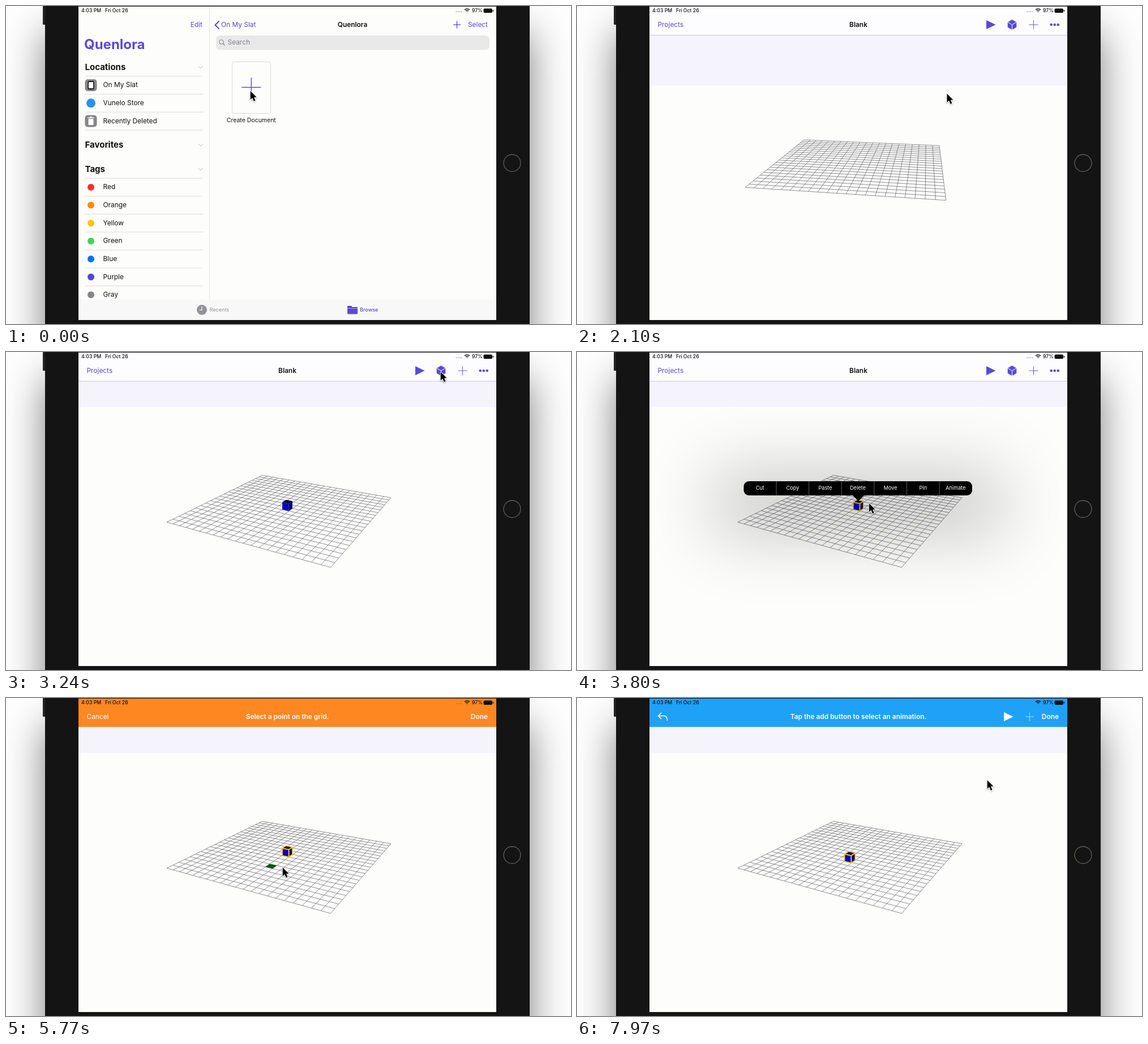
Write an HTML page with a canvas that moves like this. It is 998x561 px and loops after 8000 ms.

```html
<!DOCTYPE html>
<html lang="en">
<head>
<meta charset="utf-8">
<title>Tablet scene editor</title>
<style>
  html, body { margin: 0; width: 100%; height: 100%; overflow: hidden; background: #fefefe; }
  canvas { display: block; }
</style>
</head>
<body>
<canvas id="stage" width="998" height="561"></canvas>
<script>
const ctx = document.getElementById('stage').getContext('2d');
const LOOP = 8000, PURPLE = '#5b49d6', INK = '#111', PAPER = '#fdfdfc', RULE = '#dcdce2';
const SCREEN = { x: 128, y: 1, w: 738, h: 553 };
const MID = 497, BAR_Y = 33, ROW = 31.65, BODY = 11.9;
const CELLS = 21;

// Event times in ms
const OPEN = [270, 800], DRAG = [1607, 2740], CUBE = 3020, SELECT = 3600, MENU = [3640, 4080];
const POPOVER = [4360, 5060], POINT = [5060, 6320], MARK = 5480, PLAY = [7430, 8430];

// Pointer stops: arrival time, x, y and optional travel time
const STOPS = [
  [0, 432, 150],
  [1640, 730, 134],
  [2740, 516, 192, 1070],
  [3020, 768, 35],
  [3560, 498, 270],
  [4040, 668, 242],
  [4330, 799, 36],
  [4500, 642, 69, 120],
  [5440, 468, 297],
  [5750, 489, 299, 150],
  [6220, 836, 35],
  [6850, 762, 35],
  [7800, 725, 145]
];

const clamp = (v, lo = 0, hi = 1) => Math.max(lo, Math.min(hi, v));
const mix = (a, b, p) => a + (b - a) * p;
const progress = (t, [from, to]) => clamp((t - from) / (to - from));
const smooth = p => p * p * (3 - 2 * p);
const within = (t, [from, to]) => t >= from && t < to;

function pointer(t) {
  let [, x, y] = STOPS[0];
  for (const [arrive, nx, ny, travel = 300] of STOPS.slice(1)) {
    const p = smooth(progress(t, [arrive - travel, arrive]));
    x = mix(x, nx, p);
    y = mix(y, ny, p);
  }
  return [x, y];
}

function text(s, x, y, { size = BODY, color = INK, weight = 400, align = 'left' } = {}) {
  ctx.font = `${weight} ${size}px Inter, sans-serif`;
  ctx.textAlign = align;
  ctx.textBaseline = 'middle';
  ctx.fillStyle = color;
  ctx.fillText(s, x, y);
}
function box(x, y, w, h, color, radius = 0) {
  ctx.fillStyle = color;
  ctx.beginPath();
  ctx.roundRect(x, y, w, h, radius);
  ctx.fill();
}
function dot(x, y, r, color) {
  ctx.fillStyle = color;
  ctx.beginPath();
  ctx.arc(x, y, r, 0, 7);
  ctx.fill();
}
function ring(x, y, r, color, width, from = 0, to = Math.PI * 2) {
  ctx.strokeStyle = color;
  ctx.lineWidth = width;
  ctx.beginPath();
  ctx.arc(x, y, r, from, to);
  ctx.stroke();
}
function path(points) {
  ctx.beginPath();
  points.forEach(([x, y]) => ctx.lineTo(x, y));
}
function shape(points, color) {
  path(points);
  ctx.fillStyle = color;
  ctx.fill();
}
function line(points, color, width = 1) {
  path(points);
  ctx.strokeStyle = color;
  ctx.lineWidth = width;
  ctx.stroke();
}
function plus(x, y, r, color, width) {
  line([[x - r, y], [x + r, y]], color, width);
  line([[x, y - r], [x, y + r]], color, width);
}
// An open "v" of half width r; dx or dy picks its direction
function chevron(x, y, r, dx, dy, color, width) {
  line([[x - r * (dx + dy), y + r * (dx - dy)], [x, y], [x - r * (dx - dy), y - r * (dx + dy)]], color, width);
}
// Shadow alone: its box is drawn off stage
function shadow(x, y, w, h, blur, alpha) {
  ctx.save();
  ctx.shadowColor = `rgba(0,0,0,${alpha})`;
  ctx.shadowBlur = blur;
  ctx.shadowOffsetX = 3000;
  box(x - 3000, y, w, h, '#000', 10);
  ctx.restore();
}
function faded(alpha, draw) {
  if (alpha <= 0) return;
  ctx.save();
  ctx.globalAlpha *= alpha;
  draw();
  ctx.restore();
}
function bar(color) {
  box(SCREEN.x, 0, SCREEN.w, 51, color);
}
function title(s, color = INK, x = MID) {
  text(s, x, BAR_Y + 0.5, { color, weight: 600, align: 'center' });
}
function done() {
  text('Done', 851, BAR_Y + 0.5, { color: '#fff', weight: 600, align: 'right' });
}
const playIcon = (x, color) => shape([[x, BAR_Y - 8], [x + 16.5, BAR_Y], [x, BAR_Y + 8]], color);

function drawTablet() {
  box(0, 0, 998, 561, '#fefefe');
  shadow(71, 48, 852, 700, 72, 0.54);
  box(65, 0, 6, 33, '#222', 1);
  box(69, 0, 856, 561, '#141414');
  ring(894, 277, 15, '#625f59', 1.3);
}

function drawStatus() {
  const small = { size: 8.7, weight: 500 };
  text('4:03 PM', 133, 8, small);
  text('Fri Oct 26', 175, 8, small);
  for (let i = 0; i < 4; i++) dot(795.5 + i * 3, 10, 0.8, '#777');
  for (let i = 0; i < 3; i++) ring(814.5, 11, 1 + i * 2.6, INK, 1.3, -Math.PI * 0.76, -Math.PI * 0.24);
  text('97%', 823, 8, small);
  box(843.5, 4.5, 15.5, 7.5, INK, 2);
  box(859.8, 6.8, 1.4, 3, INK);
}

function drawSidebar() {
  const edge = 139.5, icon = 150, label = 171.5;
  text('Edit', 347, BAR_Y, { color: PURPLE, align: 'right' });
  text('Quenlora', 138, 69, { size: 24, color: PURPLE, weight: 700 });
  const heading = (s, y) => {
    text(s, edge, y, { size: 15, weight: 700 });
    chevron(343.5, y + 2, 4, 0, 1, '#b9b9be', 1);
  };
  const rows = (names, y, drawIcon) => names.forEach((name, i) => {
    const rowY = y + i * ROW;
    line([[edge, rowY - ROW / 2], [348, rowY - ROW / 2]], RULE);
    drawIcon(i, rowY);
    text(name, label, rowY);
  });
  const drawPlaceIcon = (i, y) => {
    if (i === 1) return dot(icon, y, 8, '#2393f0');
    box(icon - 10.5, y - 10.5, 21, 21, '#85858a', 5);
    if (i === 0) {
      box(icon - 5.5, y - 7.5, 11, 15, INK, 2);
      box(icon - 4, y - 5.5, 8, 11, '#fff');
    } else {
      box(icon - 4.5, y - 4, 9, 11, '#fff', 1);
      box(icon - 6, y - 6.5, 12, 1.4, '#fff');
      box(icon - 2, y - 8, 4, 1.5, '#fff');
    }
  };
  heading('Locations', 108);
  rows(['On My Slat', 'Vunelo Store', 'Recently Deleted'], 139.7, drawPlaceIcon);
  line([[edge, 219], [348, 219]], RULE);
  heading('Favorites', 245);
  heading('Tags', 288);
  const tags = { Red: '#f4312d', Orange: '#fb8b0c', Yellow: '#fcc50b', Green: '#43d158',
    Blue: '#0a70f5', Purple: '#5149c9', Gray: '#858589' };
  rows(Object.keys(tags), 319.7, (i, y) => dot(icon, y, 6, Object.values(tags)[i]));
}

function drawBrowser() {
  box(SCREEN.x, 0, SCREEN.w, 554, PAPER);
  line([[359.5, 0], [359.5, 518]], '#e4e4e4');
  drawSidebar();

  chevron(369.5, BAR_Y + 0.5, 7, -1, 0, PURPLE, 2);
  text('On My Slat', 380, BAR_Y + 0.5, { color: PURPLE });
  title('Quenlora', INK, 612);
  plus(796.5, BAR_Y, 6.5, PURPLE, 1.3);
  text('Select', 851, BAR_Y + 0.5, { color: PURPLE, align: 'right' });
  box(371, 52, 483, 25.5, '#e9e9ea', 7);
  ring(380.5, 63.5, 3.7, '#808086', 1.1);
  line([[383.2, 66.2], [386.5, 69.5]], '#808086', 1.2);
  text('Search', 391.5, 64.5, { color: '#808086' });

  ctx.strokeStyle = '#dadad6';
  ctx.lineWidth = 1;
  ctx.beginPath();
  ctx.roundRect(399.5, 98.5, 68, 91, 3);
  ctx.stroke();
  plus(433.3, 143.5, 17, PURPLE, 1.4);
  text('Create Document', 433.3, 202, { size: 10.5, align: 'center' });

  box(SCREEN.x, 518, SCREEN.w, 36, '#f8f8f8');
  dot(346, 536, 9, '#929296');
  line([[346, 530], [346, 536.5], [341.5, 536.5]], '#fff', 1.2);
  text('Recents', 359.5, 536.5, { size: 9.1, color: '#929296' });
  box(603, 529, 8, 4, PURPLE, 1);
  box(603, 531, 18, 12.5, PURPLE, 1);
  line([[603, 533.5], [621, 533.5]], '#b7aef0', 0.8);
  text('Browse', 625, 536.5, { size: 9.1, color: PURPLE, weight: 500 });
  drawStatus();
}

// Orbit camera steered by the drag; the floor spans -1 to 1 both ways
function orbit(t) {
  const [x, y] = pointer(clamp(t, ...DRAG));
  const yaw = (720 - x) * 0.145, pitch = 14.7 + (y - 134) * 0.14;
  const rad = Math.PI / 180, focal = 680, distance = 4.7;
  const cosY = Math.cos(yaw * rad), sinY = Math.sin(yaw * rad);
  const cosP = Math.cos(pitch * rad), sinP = Math.sin(pitch * rad);
  const project = (px, pz) => {
    const side = px * cosY - pz * sinY, near = px * sinY + pz * cosY;
    const scale = focal / (distance - near * cosP);
    return [MID + side * scale, 277 + near * sinP * scale];
  };
  return { project, skyline: 166 - (pitch - 14.7) * 8.8 };
}
// Corners of the cell that lies the given number of rows in front of the middle
function tile(project, row, size = 1) {
  const r = size / CELLS, z = row * 2 / CELLS;
  return [[-r, z - r], [r, z - r], [r, z + r], [-r, z + r]].map(p => project(...p));
}

function drawCube(project, row, selected) {
  const base = tile(project, row, 0.95), top = base.map(([x, y]) => [x, y - 13]);
  const faces = [
    [top, '#00003c'],
    [[top[3], top[2], base[2], base[3]], '#0505c4'],
    [[top[2], top[1], base[1], base[2]], '#000070']
  ];
  ctx.lineJoin = 'round';
  for (const [points, color] of faces) shape(points, color);
  if (selected) for (const [points] of faces) line([...points, points[0]], '#efc62c', 1.6);
}

function drawScene(t) {
  const { project, skyline } = orbit(t);
  box(SCREEN.x, 0, SCREEN.w, 554, PAPER);
  box(SCREEN.x, 51, SCREEN.w, skyline - 51, '#f5f4fd');
  for (let i = 0; i <= CELLS; i++) {
    const at = i / CELLS * 2 - 1;
    line([project(at, -1), project(at, 1)], '#69696e', 0.75);
    line([project(-1, at), project(1, at)], '#69696e', 0.75);
  }
  if (within(t, [MARK, POINT[1]])) shape(tile(project, 4), '#05590f');
  if (t >= CUBE) drawCube(project, 4 * progress(t, PLAY), t >= SELECT);
}

function drawEditorBar() {
  bar('#fdfcfe');
  line([[SCREEN.x, 51.5], [866, 51.5]], '#c9c4ec');
  text('Projects', 142.5, BAR_Y + 0.5, { color: PURPLE });
  title('Blank');
  playIcon(723, PURPLE);
  const hexagon = Array.from({ length: 6 }, (_, i) =>
    [768.5 + 9 * Math.sin(i * Math.PI / 3), BAR_Y - 9 * Math.cos(i * Math.PI / 3)]);
  shape(hexagon, PURPLE);
  for (const i of [1, 3, 5]) line([[768.5, BAR_Y], hexagon[i]], '#fff');
  plus(806.5, BAR_Y, 8, PURPLE, 0.9);
  for (let i = -1; i <= 1; i++) dot(843.7 + i * 6, BAR_Y, 2.3, PURPLE);
}

function drawAnimationBar(dimmed) {
  bar('#1fa1f8');
  chevron(143.5, 31.5, 5.5, -1, 0, '#fff', 1.5);
  ctx.beginPath();
  ctx.moveTo(144, 31.5);
  ctx.lineTo(153, 31.5);
  ctx.quadraticCurveTo(159.5, 31.5, 159.5, 40);
  ctx.stroke();
  title('Tap the add button to select an animation.', '#fff');
  playIcon(754, dimmed ? '#dceefb' : '#fff');
  plus(799.5, BAR_Y, 7.5, dimmed ? '#a5d5f6' : '#c5e5fd', 0.9);
  done();
}

function drawPointBar() {
  bar('#fd8721');
  text('Cancel', 142.5, BAR_Y + 0.5, { color: '#fff' });
  title('Select a point on the grid.', '#fff');
  done();
}

function drawMenu() {
  shadow(240, 215, 514, 105, 125, 0.23);
  box(294.5, 228, 403.5, 25, '#000', 9);
  shape([[486, 252], [MID, 263], [508, 252]], '#000');
  ['Cut', 'Copy', 'Paste', 'Delete', 'Move', 'Pin', 'Animate'].forEach((label, i) => {
    const x = 323.3 + i * 57.6;
    if (i) line([[x - 28.8, 228], [x - 28.8, 253]], '#77777a', 0.8);
    text(label, x, 240.7, { size: 9.2, color: '#fff', align: 'center' });
  });
}

function drawPopover() {
  box(628, 51, 230, 251, PAPER, 9);
  shape([[788, 52], [799.5, 40.5], [811, 52]], PAPER);
  text('Edit', 847, 69, { color: PURPLE, align: 'right' });
}

function drawEditor(t) {
  const popover = within(t, POPOVER) ? progress(t, [POPOVER[0], POPOVER[0] + 90]) : 0;
  drawScene(t);
  faded(popover, () => shadow(628, 70, 230, 280, 130, 0.26));
  if (t < MENU[1]) drawEditorBar();
  else if (within(t, POINT)) drawPointBar();
  else drawAnimationBar(popover > 0);
  drawStatus();
  if (within(t, MENU)) faded(progress(t, [MENU[0], MENU[0] + 100]), drawMenu);
  faded(popover, drawPopover);
}

function drawPointer(t) {
  const [x, y] = pointer(t);
  const arrow = [[0, 0], [0, 17], [3.9, 13.4], [6.8, 20], [9.8, 18.7], [7, 12.2], [12, 12], [0, 0]];
  ctx.save();
  ctx.translate(x - 0.3, y);
  ctx.scale(0.9, 0.9);
  ctx.shadowColor = 'rgba(0,0,0,.3)';
  ctx.shadowBlur = 3;
  ctx.shadowOffsetY = 1.5;
  ctx.lineJoin = 'round';
  line(arrow, '#fff', 2);
  ctx.shadowColor = 'transparent';
  shape(arrow, '#000');
  ctx.restore();
}

function draw(now) {
  const t = now % LOOP;
  drawTablet();
  ctx.save();
  ctx.beginPath();
  ctx.rect(SCREEN.x, SCREEN.y, SCREEN.w, SCREEN.h);
  ctx.clip();
  const p = smooth(progress(t, OPEN));
  if (p < 1) drawBrowser();
  if (p > 0) {
    // The new document grows out of its thumbnail
    ctx.translate(mix(399, SCREEN.x, p), mix(98, 0, p));
    ctx.scale(mix(69 / SCREEN.w, 1, p), mix(92 / SCREEN.h, 1, p));
    ctx.translate(-SCREEN.x, 0);
    faded(clamp(p * 3), () => drawEditor(t));
  }
  ctx.restore();
  drawPointer(t);
}

function tick() {
  draw(performance.now());
  requestAnimationFrame(tick);
}
tick();
</script>
</body>
</html>
```
